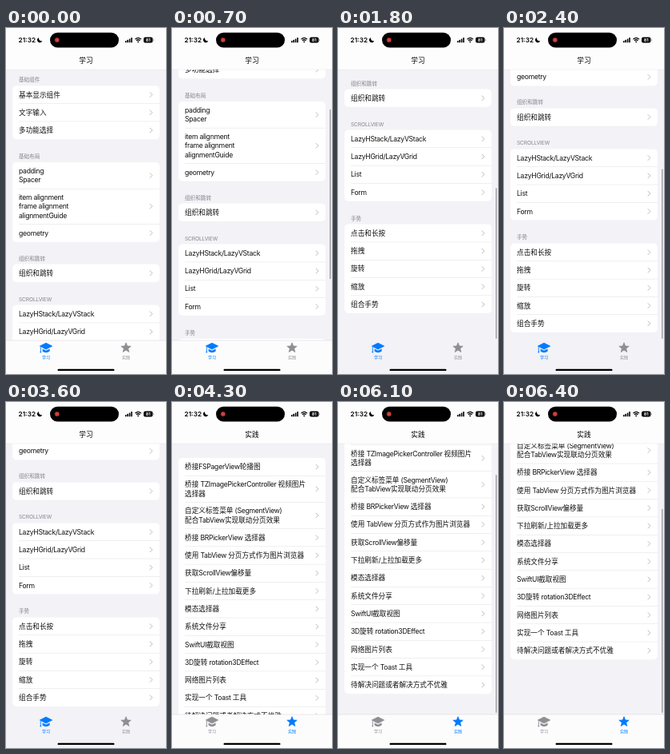
An HTML page for the animation above (6500 ms loop, 200 by 433 pixels).

```html
<!DOCTYPE html>
<html lang="zh-CN">
<head>
<meta charset="utf-8">
<title>学习</title>
<style>
  html, body { margin: 0; width: 100%; height: 100%; overflow: hidden; background: #f2f2f7; }
  svg { display: block; width: 100vw; height: 100vh; }
  text { font-family: Inter, "Noto Sans CJK SC", "Noto Sans CJK", sans-serif; font-size: 8.65px; white-space: pre; }
  .row { fill: #111; }
  .latin { letter-spacing: -.28px; }
  .head { font-size: 6.62px; fill: #85858b; }
  .head .latin { letter-spacing: -.12px; }
  .title { font-weight: 500; text-anchor: middle; }
  .tab { font-size: 5.1px; font-weight: 500; text-anchor: middle; stroke: none; }
  .clock { font-size: 8.2px; font-weight: 600; text-anchor: middle; }
  .level { font-size: 5.4px; font-weight: 700; fill: #fff; text-anchor: middle; }
</style>
</head>
<body>
<svg id="stage" viewBox="0 0 200 433" preserveAspectRatio="none">
  <rect width="200" height="433" fill="#f2f2f7"/>
  <g id="study"></g>
  <g id="practice"></g>
  <rect id="thumb" x="197" width="1.6" rx=".8" fill="#a4a4a8"/>

  <rect width="200" height="52" fill="#fdfdfd"/>
  <rect y="51.8" width="200" height=".4" fill="#e2e2e5"/>
  <text id="title" class="title" x="100" y="44.3"></text>

  <text class="clock" x="26.3" y="18">21:32</text>
  <path d="M41 11.9a3.3 3.3 0 1 0 4.3 4.3a3.5 3.5 0 0 1 -4.3 -4.3z"/>
  <rect x="55" y="5.7" width="86" height="18.8" rx="9.4"/>
  <circle cx="63.8" cy="15.1" r="3.3" fill="#4a1614"/>
  <circle cx="63.8" cy="15.1" r="2.5" fill="#d0423c"/>
  <g id="signal"></g>
  <g fill="none" stroke="#000" stroke-width="1.2">
    <path d="M161.4 14.1q3.8 -3.6 7.6 0"/>
    <path d="M162.9 15.8q2.3 -2.1 4.6 0"/>
  </g>
  <path d="M163.9 17q1.3 -1.1 2.6 0l-1.3 1.4z"/>
  <rect x="172" y="11.6" width="11.4" height="6.8" rx="2"/>
  <rect x="183.8" y="13.9" width=".8" height="2.2" rx=".4" fill="#777"/>
  <text class="level" x="177.7" y="17">81</text>

  <rect id="bar" y="391" width="200" height="42"/>
  <rect id="edge" y="390.8" width="200" height=".4" fill="#c8c8cc"/>
  <g id="tabStudy">
    <path d="M50 394.2L57.7 398.1L50 402.1L42.3 398.1Z" stroke="currentColor" stroke-width=".8" stroke-linejoin="round"/>
    <path d="M45.6 401.4L50 403.7L54.6 401.4V404.6Q50 408 45.6 404.6Z"/>
    <path d="M43.3 399.3V405.4" fill="none" stroke="currentColor" stroke-width=".9"/>
    <circle cx="43.3" cy="405.6" r=".9"/>
    <text class="tab" x="50" y="413.8">学习</text>
  </g>
  <g id="tabPractice">
    <path id="star" stroke="currentColor" stroke-width=".8" stroke-linejoin="round"/>
    <text class="tab" x="150" y="413.8">实践</text>
  </g>
  <rect x="64.5" y="426.7" width="71" height="2.4" rx="1.2"/>
</svg>
<script>
const LOOP = 6500, STEP = 100, VIEW_TOP = 52, VIEW_H = 339, LIST_END = 381;
const ROW = [0, 22.3, 33.1, 44.3], LINE = 11.2;
const $ = id => document.getElementById(id);
const clamp = v => Math.max(0, Math.min(1, v));

function add(parent, tag, attrs, text) {
  const el = document.createElementNS("http://www.w3.org/2000/svg", tag);
  for (const k in attrs) el.setAttribute(k, attrs[k]);
  if (text) el.textContent = text;
  parent.appendChild(el);
  return el;
}

// Latin runs are tracked tighter than Chinese ones.
function label(parent, name, x, y, str) {
  const el = add(parent, "text", { class: name, x, y });
  for (const run of str.match(/[ -~]+|[^ -~]+/g))
    add(el, "tspan", /[ -~]/.test(run) ? { class: "latin" } : {}, run);
}

// Draws one rounded section and returns its bottom edge.
function card(parent, top, rows, head) {
  const heights = rows.map(r => ROW[r.split("\n").length]);
  const total = heights.reduce((a, b) => a + b, 0);
  if (head) label(parent, "head", 16, top - 5, head);
  add(parent, "rect", { x: 8, y: top, width: 184, height: total, rx: 5, fill: "#fff" });
  let y = top;
  rows.forEach((row, i) => {
    const mid = y + heights[i] / 2, lines = row.split("\n");
    if (i) add(parent, "rect", { x: 16, y: y - .2, width: 176, height: .45, fill: "#dcdcdf" });
    lines.forEach((line, n) =>
      label(parent, "row", 16, mid + 3.1 + (n - (lines.length - 1) / 2) * LINE, line));
    add(parent, "path", {
      d: `M180 ${mid - 2.9}l2.9 2.9l-2.9 2.9`, fill: "none", stroke: "#bcbcc0",
      "stroke-width": 1, "stroke-linecap": "round", "stroke-linejoin": "round"
    });
    y += heights[i];
  });
  return y;
}

const study = $("study"), practice = $("practice");
card(study, 72.3, ["基本显示组件", "文字输入", "多功能选择"], "基础组件");
card(study, 168, ["padding\nSpacer", "item alignment\nframe alignment\nalignmentGuide", "geometry"], "基础布局");
card(study, 295.6, ["组织和跳转"], "组织和跳转");
card(study, 346.6, ["LazyHStack/LazyVStack", "LazyHGrid/LazyVGrid", "List", "Form"], "SCROLLVIEW");
const studyMax = card(study, 464.7, ["点击和长按", "拖拽", "旋转", "缩放", "组合手势"], "手势") - LIST_END;
const practiceMax = card(practice, 70, [
  "桥接FSPagerView轮播图",
  "桥接 TZImagePickerController 视频图片\n选择器",
  "自定义标签菜单 (SegmentView)\n配合TabView实现联动分页效果",
  "桥接 BRPickerView 选择器",
  "使用 TabView 分页方式作为图片浏览器",
  "获取ScrollView偏移量",
  "下拉刷新/上拉加载更多",
  "模态选择器",
  "系统文件分享",
  "SwiftUI截取视图",
  "3D旋转 rotation3DEffect",
  "网络图片列表",
  "实现一个 Toast 工具",
  "待解决问题或者解决方式不优雅"
]) - LIST_END;

for (let i = 0; i < 4; i++) {
  const h = 2.2 + i * 1.3;
  add($("signal"), "rect", { x: 149 + i * 2.4, y: 18.2 - h, width: 1.6, height: h, rx: .5 });
}
let star = "";
for (let i = 0; i < 10; i++) {
  const a = i * Math.PI / 5 - Math.PI / 2, r = i % 2 ? 2.8 : 6.5;
  star += (i ? "L" : "M") + (150 + r * Math.cos(a)) + " " + (400.3 + r * Math.sin(a));
}
$("star").setAttribute("d", star + "Z");

// Finger drags: [time, offset]
const dragStudy = [[300, 0], [400, 3], [500, 20], [700, 76], [900, 134], [1100, 184],
  [1200, 203], [1300, 218], [1400, 230], [1500, 239], [1600, 244]];
const dragPractice = [[5600, 0], [5700, 3], [5800, 10], [5900, 18], [6000, 27], [6100, 38.6], [6400, 81.5]];

function along(keys, t) {
  if (t <= keys[0][0]) return keys[0][1];
  for (let i = 1; i < keys.length; i++) {
    const [t0, v0] = keys[i - 1], [t1, v1] = keys[i];
    if (t <= t1) return v0 + (v1 - v0) * (t - t0) / (t1 - t0);
  }
  return keys[keys.length - 1][1];
}

function studyOffset(t) {
  if (t <= 1700) return along(dragStudy, t);
  return t >= 2400 ? studyMax : studyMax + (244 - studyMax) * Math.exp(-(t - 1700) / 140);
}

function thumb(offset, max, alpha) {
  const track = VIEW_H - 4;
  const full = track * VIEW_H / (VIEW_H + max);
  const size = full - Math.max(0, offset - max);
  const top = VIEW_TOP + 2 + Math.min(1, offset / max) * (track - full) + full - size;
  const el = $("thumb");
  el.setAttribute("y", top);
  el.setAttribute("height", size);
  el.setAttribute("opacity", alpha);
}

function tint(id, on) {
  const color = on ? "#007aff" : "#8e8e93";
  $(id).setAttribute("fill", color);
  $(id).style.color = color;
}

function draw(t) {
  const second = t >= 3900;
  const max = second ? practiceMax : studyMax;
  const offset = second ? along(dragPractice, t) : studyOffset(t);
  const list = second ? practice : study;
  study.style.display = second ? "none" : "";
  practice.style.display = second ? "" : "none";
  list.setAttribute("transform", `translate(0 ${-offset})`);
  $("title").textContent = second ? "实践" : "学习";
  tint("tabStudy", !second);
  tint("tabPractice", second);

  // The tab bar clears only at the end of the first list.
  const solid = second ? clamp((t - 3800) / 400) : clamp((max - offset) / 14);
  const mix = (a, b) => Math.round(a + (b - a) * solid);
  $("bar").setAttribute("fill", `rgb(${mix(242, 252)},${mix(242, 252)},${mix(247, 253)})`);
  $("edge").setAttribute("opacity", solid);

  const shown = second ? t >= 5600 : t >= 400;
  const fade = second ? 1 : clamp((3600 - t) / 300);
  thumb(offset, max, shown ? fade : 0);
}

const start = performance.now();
function tick() {
  const t = (performance.now() - start) % LOOP;
  draw(Math.floor(t / STEP) * STEP);
  requestAnimationFrame(tick);
}
draw(0);
requestAnimationFrame(tick);
</script>
</body>
</html>
```
